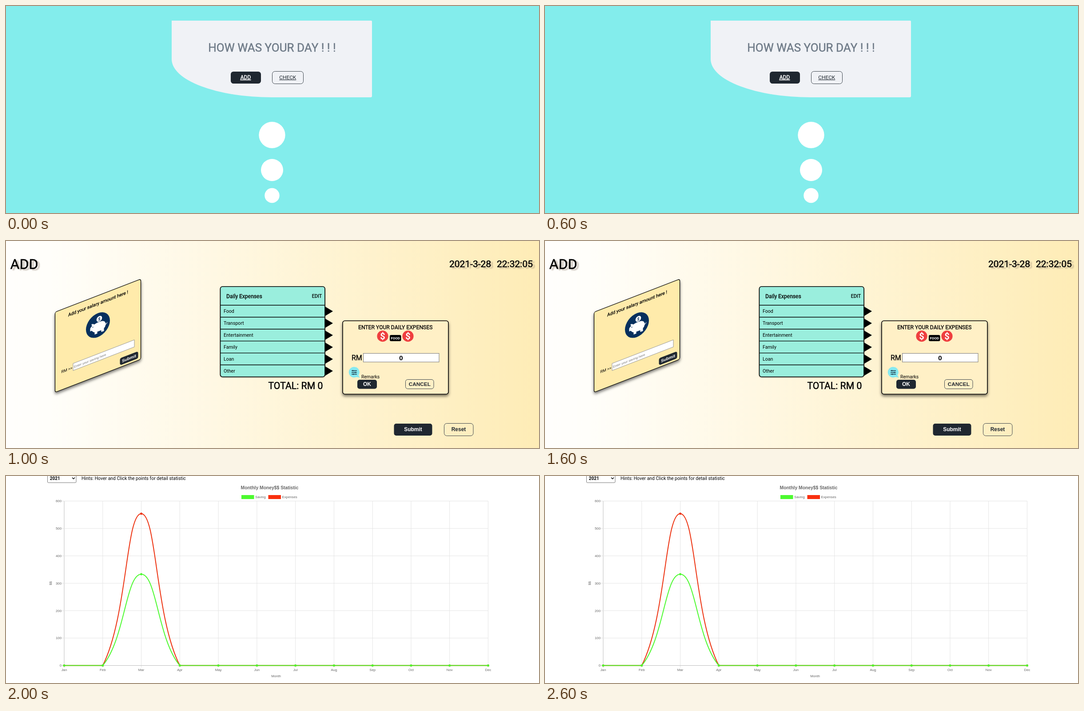
Write an HTML page that moves like this. It is 1200 px wide and 467 px high and loops after 3000 ms.

```html
<!DOCTYPE html>
<html lang="en">
<head>
<meta charset="utf-8">
<title>Expense tracker</title>
<style>
  html, body { margin: 0; width: 100%; height: 100%; overflow: hidden; background: #fff; }
  svg { display: block; width: 100%; height: 100%; }
  text { font-family: Roboto, sans-serif; white-space: pre; }
  .arial { font-family: "Liberation Sans", Arial, sans-serif; }
  .bold { font-weight: 700; }
  .mid { text-anchor: middle; }
  .end { text-anchor: end; }
  .heavy { stroke: currentColor; stroke-width: .5px; }
  .dark { fill: #1f2730; }
  .outline { fill: none; stroke: #3c444c; stroke-width: 1; }
  .lift { filter: drop-shadow(0 4px 3px #0008); }
  .glow { filter: drop-shadow(5px 3px 1.2px #8a7a6a70); }
</style>
</head>
<body>
<svg id="stage" viewBox="0 0 1200 467" preserveAspectRatio="none" xmlns="http://www.w3.org/2000/svg">
  <defs>
    <linearGradient id="cream">
      <stop offset="0" stop-color="#fffefc"/>
      <stop offset=".08" stop-color="#fffefa"/>
      <stop offset="1" stop-color="#feecb6"/>
    </linearGradient>
  </defs>

  <g id="home">
    <rect width="1200" height="467" fill="#83edec"/>
    <path d="M373 33H822a2 2 0 0 1 2 2V203a3 3 0 0 1-3 3H598A225 86 0 0 1 373 120Z" fill="#f0f2f6"/>
    <text class="mid heavy" x="599" y="103" font-size="26" fill="#6f7b88" color="#6f7b88">HOW WAS YOUR DAY ! ! !</text>
    <rect class="dark" x="506" y="148" width="68" height="27" rx="6"/>
    <text class="mid heavy" x="539.5" y="165" font-size="12" fill="#fff" color="#fff" text-decoration="underline">ADD</text>
    <rect class="outline" x="599.5" y="147.5" width="70" height="28" rx="6"/>
    <text class="mid" x="634.3" y="165" font-size="11.8" fill="#1f2730" text-decoration="underline">CHECK</text>
    <g fill="#fff">
      <circle cx="599" cy="291" r="29.7"/>
      <circle cx="599" cy="370" r="25"/>
      <circle cx="599" cy="427.5" r="16.7"/>
    </g>
  </g>

  <g id="add">
    <rect width="1200" height="467" fill="url(#cream)"/>
    <g class="glow">
      <text class="heavy" x="9.5" y="63" font-size="32">ADD</text>
      <text class="heavy" x="998" y="59" font-size="21">2021-3-28</text>
      <text class="heavy" x="1105" y="59" font-size="21">22:32:05</text>
    </g>

    <g class="lift">
      <g transform="matrix(1 -.387 0 1 110.5 160.5)">
        <rect width="193" height="181" rx="4" fill="#ffebab" stroke="#000" stroke-width="1.3"/>
        <text class="heavy" style="stroke-width:.3px" x="29.5" y="21.5" font-size="10.2">Add your salary amount here !</text>
        <circle cx="96.5" cy="66.5" r="27" fill="#06305e"/>
        <g fill="#fff">
          <circle cx="99.5" cy="53.5" r="6.3"/>
          <path d="M79 68q1-3 4-4l-1-5q4 0 6 3q10-3 18-1q7 2 8 9q3 0 3-3q2 3-3 5q-1 5-4 7v6h-6v-4h-9v4h-6v-5q-4-2-6-6h-4z"/>
        </g>
        <circle cx="85" cy="67" r="1" fill="#06305e"/>
        <text class="mid bold" x="99.5" y="57" font-size="9" fill="#06305e">$</text>
        <text x="14" y="143.5" font-size="9">RM &gt;&gt;</text>
        <rect x="40.5" y="131.5" width="138" height="16" fill="#fff" stroke="#888" stroke-width=".8"/>
        <text class="arial" x="42.5" y="142.5" font-size="7.2" fill="#757575">Enter your saving here</text>
        <rect class="dark" x="146" y="160.5" width="41" height="16" rx="4"/>
        <text class="arial bold mid" x="166.5" y="172" font-size="9.5" fill="#fff">Submit</text>
      </g>
    </g>

    <g class="lift" style="filter:drop-shadow(0 1px 1px #0005)">
      <rect x="482.5" y="102.8" width="235.5" height="203.7" rx="5" fill="#9aeedd" stroke="#000" stroke-width="1.6"/>
    </g>
    <text class="heavy" style="stroke-width:.3px" x="496" y="129" font-size="12.1">Daily Expenses</text>
    <text class="heavy end" style="stroke-width:.3px" x="711" y="128" font-size="10.67">EDIT</text>
    <g id="rows"></g>
    <text class="heavy" x="590.5" y="334" font-size="21.2">TOTAL: RM 0</text>

    <rect class="lift" x="758" y="180" width="238" height="165.5" rx="5" fill="#fff0c6" stroke="#000" stroke-width="1.6"/>
    <text class="heavy mid" style="stroke-width:.3px" x="876.7" y="199" font-size="12.15">ENTER YOUR DAILY EXPENSES</text>
    <g id="coins"></g>
    <rect x="864" y="212" width="25.5" height="14" rx="3"/>
    <text class="bold mid" x="876.7" y="222" font-size="8" fill="#fff">FOOD</text>
    <text class="heavy" style="stroke-width:.3px" x="778" y="269" font-size="16">RM</text>
    <rect x="804.5" y="253.5" width="170.5" height="19.5" fill="#fff" stroke="#777"/>
    <text class="arial bold mid" x="889.5" y="269" font-size="15">0</text>
    <path d="M783.5 284a12 12 0 1 0 5 23l8 1l-3-5a12 12 0 0 0-10-19z" fill="#86e9f0"/>
    <path d="M778 292.5h12M778 296.5h12M778 300.5h12M781 291v3M786.5 295v3M782 299v3" stroke="#1f3a48" stroke-width="1.3"/>
    <text x="800" y="310" font-size="10.5">Remarks</text>
    <rect class="dark" x="791" y="313" width="44" height="20.5" rx="5"/>
    <text class="arial bold mid" x="813" y="327" font-size="12" fill="#fff">OK</text>
    <rect class="outline" x="899.5" y="312.5" width="63.5" height="21" rx="5"/>
    <text class="arial bold mid dark" x="931.3" y="327" font-size="11.8">CANCEL</text>
    <rect class="dark" x="873.5" y="412" width="86" height="27" rx="5"/>
    <text class="arial bold mid" x="916.5" y="429" font-size="12" fill="#fff">Submit</text>
    <rect class="outline" x="986.5" y="411.5" width="65.5" height="28" rx="6"/>
    <text class="arial bold mid dark" x="1019" y="429" font-size="12">Reset</text>
  </g>

  <g id="check">
    <rect width="1200" height="467" fill="#fff"/>
    <rect x="93.5" y="-9.5" width="64.5" height="24.5" rx="2" fill="#fff" stroke="#767676"/>
    <text class="bold" x="98.8" y="9" font-size="10">2021</text>
    <path d="M149 3.5l3 3l3-3" fill="none" stroke="#000" stroke-width="1.5"/>
    <text x="170" y="9" font-size="10.45">Hints: Hover and Click the points for detail statistic</text>
    <text class="arial bold mid" x="593.5" y="29.5" font-size="10.35" fill="#666">Monthly Money$$ Statistic</text>
    <rect x="530" y="43" width="28.5" height="9" fill="#4dfa30"/>
    <rect x="590.5" y="43" width="28.5" height="9" fill="#f9300f"/>
    <g font-size="7.8" fill="#666">
      <text class="arial" x="561" y="49.5">Saving</text>
      <text class="arial" x="621.5" y="49.5">Expenses</text>
      <text class="arial mid" x="608" y="453.5">Month</text>
      <text class="arial mid" transform="translate(102.5 242) rotate(-90)">$$</text>
      <g id="chart"></g>
    </g>
  </g>
</svg>
<script>
const $ = id => document.getElementById(id);

// Expense table rows with their arrow tabs
$('rows').innerHTML = ['Food', 'Transport', 'Entertainment', 'Family', 'Loan', 'Other'].map((name, i) => {
  const y = 144.8 + 26.95 * i;
  return `<path d="M482.5 ${y}H718" stroke="#000" stroke-width="1.4"/>
    <text x="490" y="${y + 17.3}" font-size="10.6">${name}</text>
    <path d="M718 ${y + 3}l18 10.8l-18 10.8z"/>`;
}).join('');

$('coins').innerHTML = [848, 905].map(x =>
  `<circle cx="${x}" cy="214.7" r="12.6" fill="#ef3f3f"/>
   <text class="bold mid" x="${x}" y="222" font-size="20" fill="#fff">$</text>`).join('');

// Chart
const months = 'Jan Feb Mar Apr May Jun Jul Aug Sep Oct Nov Dec'.split(' ');
const left = 131, right = 1085.5, top0 = 56.5, base = 427.5;
const step = (right - left) / 11;
const px = i => left + step * i;
const py = v => base - v * (base - top0) / 600;

function grid() {
  let out = '';
  months.forEach((m, i) => {
    out += `<path d="M${px(i)} ${top0}V${base + 5}" stroke="${i ? '#e4e4e4' : '#bbb'}"/>
      <text class="arial mid" x="${px(i)}" y="439.5">${m}</text>`;
  });
  for (let v = 0; v <= 600; v += 100) {
    out += `<path d="M${left - 5} ${py(v)}H${right}" stroke="${v ? '#e4e4e4' : '#bbb'}"/>
      <text class="arial end" x="125" y="${py(v) + 2.8}">${v}</text>`;
  }
  return out;
}

// One peak in March, smoothed with a tension of 0.4
function series(peak, color) {
  const rise = base - py(peak);
  const slope = Math.hypot(step, rise);
  const k = 0.4 * slope / (slope + step);
  const dx = 2 * step * k, dy = rise * k, flat = 0.4 * step;
  const line = `M${left} ${base}H${px(1)}
    C${px(1) + dx} ${base - dy} ${px(2) - flat} ${py(peak)} ${px(2)} ${py(peak)}
    S${px(3) - dx} ${base - dy} ${px(3)} ${base}H${right}`;
  const dots = months.map((_, i) =>
    `<circle cx="${px(i)}" cy="${i === 2 ? py(peak) : base}" r="2.5" fill="${color}"/>`).join('');
  return `<path d="${line}" fill="none" stroke="${color}" stroke-width="2"/>${dots}`;
}

$('chart').innerHTML = grid() + series(554, '#ed3210') + series(333, '#4dfa30');

const scenes = ['home', 'add', 'check'].map($);

function render(ms) {
  const now = Math.floor(ms % 3000 / 1000);
  scenes.forEach((scene, i) => scene.style.display = i === now ? '' : 'none');
}

function tick() {
  render(performance.now());
  requestAnimationFrame(tick);
}
tick();
</script>
</body>
</html>
```
